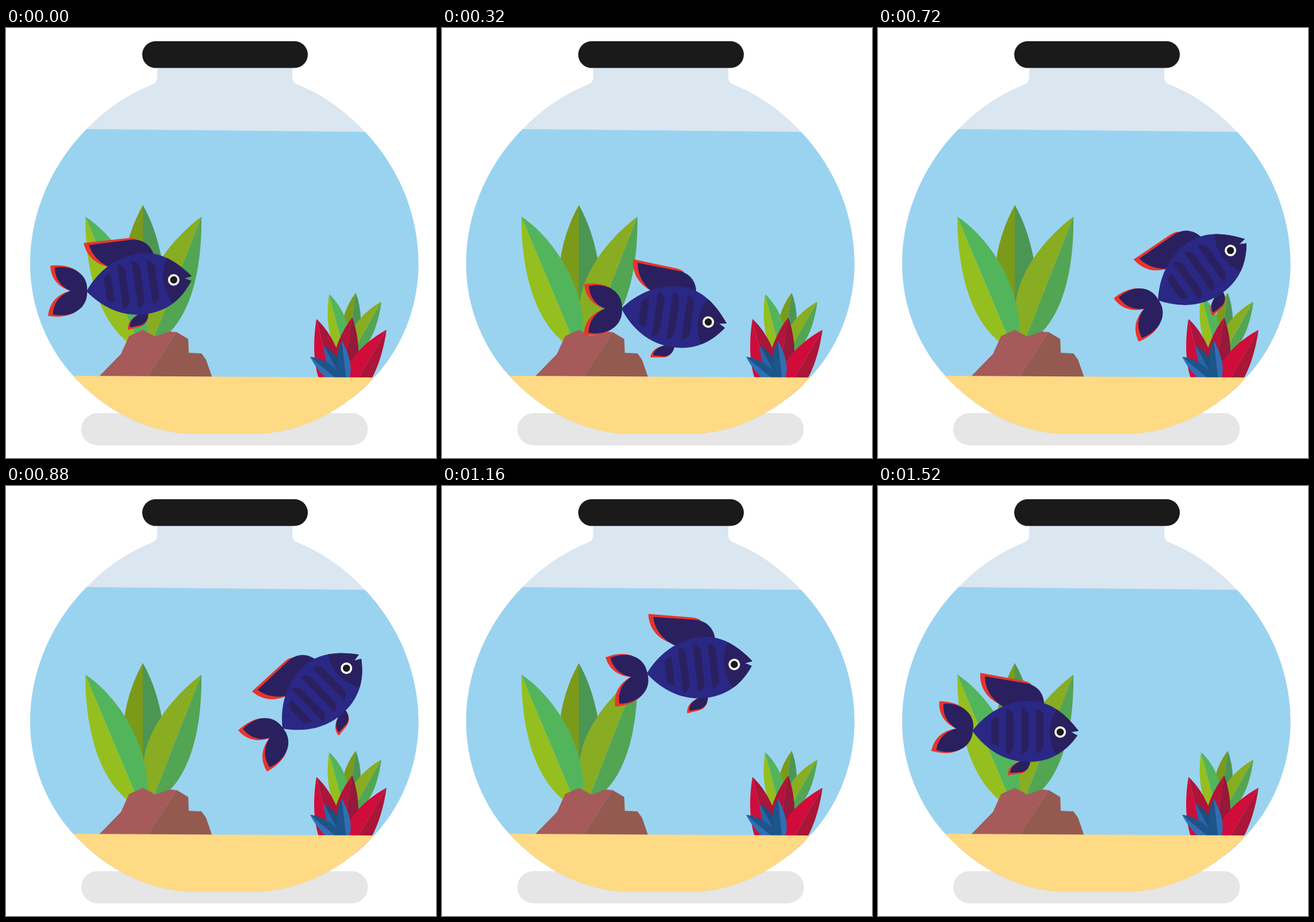
Recreate the animation shown at these times as an HTML page. Size 748 by 748 pixels, loop 1560 ms.

```html
<!DOCTYPE html>
<html lang="en">
<head>
<meta charset="utf-8">
<title>Fish bowl</title>
<style>
  html, body { margin: 0; width: 100%; height: 100%; overflow: hidden; background: #fff; }
  svg { display: block; width: 100vw; height: 100vh; }
  .green { --a: #95bf1f; --b: #52b55b; --c: #7c9a19; --d: #4c9653; --e: #88ad22; --f: #52a553; }
  .red   { --a: #cf0d3b; --b: #ab1539; --c: #b5143a; --d: #96183a; --e: #d00c3a; --f: #ab1538; }
  .blue  { --a: #2d70b5; --b: #1c5589; --c: #2467a8; --d: #1a4f80; --e: #1c5589; --f: #2d70b5; }
  .dark { fill: #2a2060; }
  .edge { fill: #e8342d; }
</style>
</head>
<body>
<svg viewBox="0 0 748 748">
  <defs>
    <path id="bowl" d="M263 66V86Q263 95 255 98C210 116 172 143 140 176C79 238 42 322 42 410C42 485 71 555 117 605C175 668 250 706 330 706H430C510 706 585 668 643 605C689 555 717.5 485 717.5 410C717.5 322 681 238 620 176C588 143 551 116 506 98Q498 95 498 86V66Z"/>
    <clipPath id="inside"><use href="#bowl"/></clipPath>
    <g id="plant">
      <path fill="var(--c)" d="M238 308Q212 355 205 408L238 480Z"/>
      <path fill="var(--d)" d="M238 308Q262 350 272 408L238 480Z"/>
      <path fill="var(--e)" d="M340 328C282 372 215 455 246 540H257Z"/>
      <path fill="var(--f)" d="M340 328C341 420 322 492 284 530L257 540Z"/>
      <path fill="var(--a)" d="M138 328C138 422 160 505 212 547L225 535Z"/>
      <path fill="var(--b)" d="M138 328C198 368 250 455 246 537L225 535Z"/>
    </g>
    <path id="body" d="M0 0C28 -36 64 -52 100 -52C138 -52 165 -26 185 0L172 2L183 8C160 40 132 54 98 54C62 54 28 38 0 0Z"/>
    <clipPath id="skin"><use href="#body"/></clipPath>
    <g id="lobe">
      <path class="edge" d="M-24 1C-46 -4 -62 -18 -64 -43C-44 -46 -26 -42 -16 -34Z"/>
      <path class="dark" d="M-25 1C-42 -5 -55 -18 -56 -40C-28 -46 4 -32 1 2Z"/>
    </g>
    <path id="stripe" d="M0 0Q13 4 13 16V64Q13 76 0 80Z"/>
  </defs>

  <rect x="131" y="670" width="498.5" height="56" rx="28" fill="#e6e6e6"/>
  <use href="#bowl" fill="#dae6f0"/>
  <g clip-path="url(#inside)">
    <path fill="#9ad3f0" d="M0 174.5L748 182V748H0Z"/>
    <use href="#plant" class="green"/>
    <use href="#plant" class="green" transform="translate(562 463) rotate(8.1) scale(.455) translate(-138 -328)"/>
    <use href="#plant" class="red" transform="translate(540 506) rotate(8.9) scale(.611) translate(-138 -328)"/>
    <use href="#plant" class="blue" transform="translate(529 572) rotate(-27.8) scale(.308) translate(-138 -328)"/>
    <path fill="#a65a5a" d="M160 608L200 567L214 536L238 525L260 537L284 528L297 529L245 608Z"/>
    <path fill="#945a50" d="M297 529L317 541L318 565L340 566L348 577L359 609L245 608Z"/>
    <path fill="#ffda85" d="M0 604.3L748 608.6V748H0Z"/>
  </g>
  <rect x="237" y="23" width="288" height="46.5" rx="23.2" fill="#1a1a1a"/>

  <g id="fish">
    <g id="tail">
      <use href="#lobe"/>
      <use href="#lobe" transform="scale(1.03 -1.03)"/>
    </g>
    <g id="fin">
      <path class="edge" d="M14 -101L90 -87Q99 -85 103 -81L70 -60L60 -42C26 -52 12 -76 14 -101Z"/>
      <path class="dark" d="M22 -95L98 -82C118 -76 125 -60 125 -46L100 -20L62 -38C38 -48 22 -70 22 -95Z"/>
    </g>
    <path class="edge" d="M62 77C62 64 72 55 90 52L101 52C100 66 92 73 84 74Z"/>
    <path class="dark" d="M66 73C66 62 76 54 92 50L101 50C101 64 93 71 84 72Z"/>
    <use href="#body" fill="#2a2884"/>
    <g class="dark" clip-path="url(#skin)">
      <path d="M148 -40Q122 0 147 44H200V-40Z"/>
      <use href="#stripe" transform="translate(46 -25) scale(-1 .64)"/>
      <use href="#stripe" transform="translate(59 -39)"/>
      <use href="#stripe" transform="translate(85 -42) scale(1 1.05)"/>
      <use href="#stripe" transform="translate(111 -39) scale(1 .98)"/>
    </g>
    <circle cx="153" cy="2" r="10" fill="#fff"/>
    <circle cx="153" cy="2" r="6.3" fill="#1a1a1a"/>
  </g>
</svg>
<script>
  const LOOP = 1560, STEP = 40;
  // time, x, y, body angle, tail angle on stage, dorsal fin angle
  const poses = [
    [0, 140, 458, -8.2, 1.3, -8.6],
    [120, 200, 448, -3, 1, 3],
    [320, 312, 488, 8.1, -0.7, -6.6],
    [460, 388, 539, -10, -18, -9],
    [560, 430, 517, -18.9, -22.8, -9.6],
    [740, 491, 468, -37, -32, -9],
    [880, 481, 422, -44.1, -36.2, -8.8],
    [1040, 423, 371, -22.3, -22.8, 1],
    [1120, 372, 335, -12, -17, 1],
    [1320, 298, 314, 11.5, 5.8, 0],
    [1520, 164, 426, 0, 7.9, 0],
  ];
  const [fish, tail, fin] = ['fish', 'tail', 'fin'].map(id => document.getElementById(id));

  function pose(i) {
    const n = poses.length, [t, ...rest] = poses[(i + n) % n];
    return [t + Math.floor(i / n) * LOOP, ...rest];
  }

  // Smooth cyclic curve through the poses
  function poseAt(t) {
    const i = poses.findLastIndex(p => p[0] <= t);
    const [p, a, b, q] = [-1, 0, 1, 2].map(k => pose(i + k));
    const d = b[0] - a[0], u = (t - a[0]) / d;
    return a.map((v, k) => {
      const m = (b[k] - p[k]) / (b[0] - p[0]) * d;
      const n = (q[k] - v) / (q[0] - a[0]) * d;
      const e = b[k] - v;
      return v + u * (m + u * (3 * e - 2 * m - n + u * (m + n - 2 * e)));
    });
  }

  function draw() {
    const t = Math.floor(performance.now() % LOOP / STEP) * STEP;
    const [, x, y, turn, tailTurn, finTurn] = poseAt(t);
    fish.setAttribute('transform', `translate(${x} ${y}) rotate(${turn})`);
    tail.setAttribute('transform', `rotate(${tailTurn - turn})`);
    fin.setAttribute('transform', `rotate(${finTurn} 125 -46)`);
    requestAnimationFrame(draw);
  }
  draw();
</script>
</body>
</html>
```
